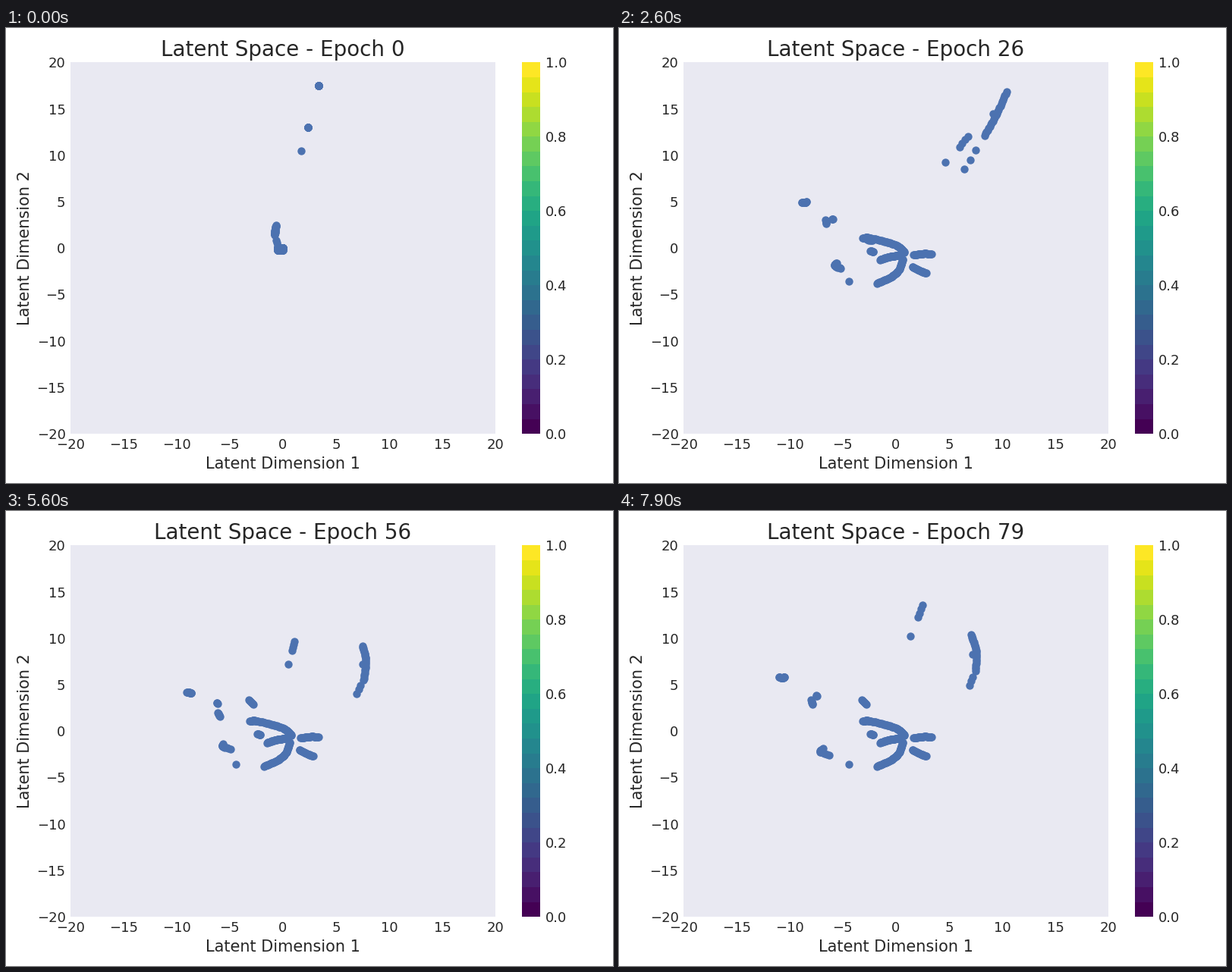
A matplotlib script for the animation above (8 s loop, 800 px wide and 600 px high).

```python
import numpy as np
import matplotlib.pyplot as plt
from matplotlib.animation import FuncAnimation

INK = "#262626"
plt.rcParams.update({
    "font.family": "DejaVu Sans", "text.color": INK, "axes.labelcolor": INK,
    "xtick.color": INK, "ytick.color": INK,
    "axes.labelsize": 15, "axes.titlesize": 20,
    "xtick.labelsize": 13, "ytick.labelsize": 13,
    "xtick.major.size": 0, "ytick.major.size": 0,
    "xtick.major.pad": 4.5, "ytick.major.pad": 4.5,
})

EPOCHS = 80
KEYS = [0, 10, 26, 40, 56, 65, 79]
epochs = np.arange(EPOCHS)


def over(*values):
    """One value per key epoch, linear in between."""
    return np.interp(epochs, KEYS, values)


def polar(r, degrees):
    return r * np.exp(1j * np.radians(degrees))


# Training noise: outer groups surge between the keys, less and less.
phase = over(*range(len(KEYS)))
jitter = 1 + np.random.default_rng(4).normal(0, 0.02, EPOCHS) * np.sin(np.pi * phase) ** 2
surge = 1 + 0.4 * (1 - epochs / 90) * np.sin(np.pi * phase) ** 2 * (phase > 1)
pull = np.interp(epochs, [10, 26], [1, 0])

# Each group: how far it leans to its wild pose, and its complex gain.
CORE = over(*[0] * 7), jitter
FLAP = over(0, 0, 0, 0, 1, 1, 1), jitter
LEFT = over(0, 0.8, 0.3, 0.3, 0, 1, 0.2), surge * over(1, 0.95, 0.9, 1.08, 1, 1, 1.15)
BEAM = over(1, 1, 1, 1, 0, 1, 0), surge * over(
    1, polar(1.87, 16), polar(1.05, 7), polar(0.82, 2), 1, 1, polar(1.06, 5))
ARM = over(*[0] * 7), surge * over(
    1, polar(1.57, -9), polar(1, -19), 1.27, polar(0.7, 4), polar(1.7, -23), 1)


def spline(points, n):
    """Catmull-Rom curve through complex points, sampled n times."""
    p = np.array(points, complex)
    if len(p) == 1:
        return np.repeat(p, n)
    q = np.concatenate([[2 * p[0] - p[1]], p, [2 * p[-1] - p[-2]]])
    u = np.linspace(0, len(p) - 1, n)
    i = np.minimum(u.astype(int), len(p) - 2)
    t = u - i
    a, b, c, d = (q[i + j] for j in range(4))
    return b + 0.5 * t * (c - a + t * (2 * a - 5 * b + 4 * c - d + t * (3 * (b - c) + d - a)))


def strand(n, calm, wild=None, group=CORE, start=(-0.5, 0), grown=10, stretch=0):
    """Dots on a curve that grows out of its start, then follows its group."""
    rest, lean = spline(calm, n), spline(wild or calm, n)
    mood, gain = (g[:, None] for g in group)
    grow = np.minimum(epochs / grown, 1)[:, None]
    pose = gain * (rest + mood * (lean - rest))
    pose = pose + stretch * pull[:, None] * np.linspace(0, 1, n)
    return (1 - grow) * np.linspace(*start, n) + grow * pose


FAR, NEAR, LOW = [3.35 + 17.5j] * 2, [2.35 + 13j] * 2, [1.75 + 10.45j] * 2

dots = np.hstack([
    # three arcs that meet at the tip
    strand(60, [-3.1 + 1.1j, -2.5 + 1.1j, -1 + .7j, .2 + .2j, .8 - .45j], stretch=1.15),
    strand(50, [-1.8 - 3.8j, -.6 - 3.2j, .25 - 2.4j, .65 - 1.2j],
           start=(-.5 - .2j, -.2j), stretch=1.1),
    strand(36, [-1.5 - 1.25j, -.5 - .9j, .4 - .8j], stretch=1.1),
    strand(8, [-2.4 - .3j, -2.1 - .4j]),
    # two bars on the right
    strand(24, [1.65 - .75j, 2.45 - .6j, 3.35 - .6j], grown=26),
    strand(22, [1.55 - 2j, 2.2 - 2.4j, 2.85 - 2.7j], grown=26),
    # flap that lifts off the upper arc, and a stray dot
    strand(7, [-2.7 + .9j, -2.2 + .8j], [-3.2 + 3.4j, -2.8 + 2.9j], FLAP),
    strand(1, [-4.4 - 3.6j], grown=26),
    # left clusters
    strand(14, [-9.05 + 4.15j, -8.8 + 4.15j, -8.6 + 4.1j],
           [-11.7 + 8.65j, -11.25 + 8.4j, -11.1 + 8.9j], LEFT, (-.65 + 2.5j, -.75 + 1.5j)),
    strand(6, [-6.1 + 2j, -5.95 + 1.6j], [-10.2 + 6.5j, -10.3 + 6.05j], LEFT,
           (-.8 + 1.9j, -.75 + 1.4j)),
    strand(3, [-6.2 + 3.05j, -6.15 + 3j], [-7.85 + 4.55j, -7.7 + 4.45j], LEFT,
           (-.65 + .85j, -.5 + .3j)),
    strand(11, [-5.6 - 1.4j, -5.7 - 1.65j, -4.95 - 1.9j],
           [-7.5 - 2.6j, -8.2 - 3.1j, -7.6 - 3.7j], LEFT, grown=26),
    # long streak, its companion and the dots at its foot
    strand(24, [7.6 + 5.5j, 7.8 + 7.6j, 7.5 + 9.15j],
           [9.3 + 10.5j, 10.6 + 12.5j, 11.8 + 14.7j], BEAM, FAR),
    strand(1, [7.5 + 7.2j], [10.3 + 12.65j], BEAM, FAR),
    strand(3, [6.95 + 4.05j, 7.3 + 4.9j], [7.05 + 7.3j, 8.35 + 9.1j], BEAM, NEAR),
    # short streak and the dot below it
    strand(4, [2.1 + 12.25j, 2.5 + 13.6j], group=ARM, start=NEAR),
    strand(1, [1.4 + 10.25j], group=ARM, start=LOW),
], dtype=complex)

fig, ax = plt.subplots(figsize=(8, 6), dpi=100, facecolor="white")
ax.set(xlim=(-20, 20), ylim=(-20, 20), facecolor="#E9E9F2",
       xlabel="Latent Dimension 1", ylabel="Latent Dimension 2")
ax.spines[:].set_visible(False)
cloud = ax.scatter(dots[0].real, dots[0].imag, s=56, c="#4C72B0", linewidths=0)
title = ax.set_title("Latent Space - Epoch 0")

scale = plt.cm.ScalarMappable(cmap=plt.get_cmap("viridis", 25))
scale.set_clim(0, 1)
bar = fig.colorbar(scale, ax=ax, ticks=np.linspace(0, 1, 6))
bar.outline.set_visible(False)
fig.tight_layout()


def update(epoch):
    cloud.set_offsets(np.column_stack([dots[epoch].real, dots[epoch].imag]))
    title.set_text(f"Latent Space - Epoch {epoch}")
    return cloud, title


anim = FuncAnimation(fig, update, frames=EPOCHS, interval=100, repeat=True, repeat_delay=0)
plt.show()
```
